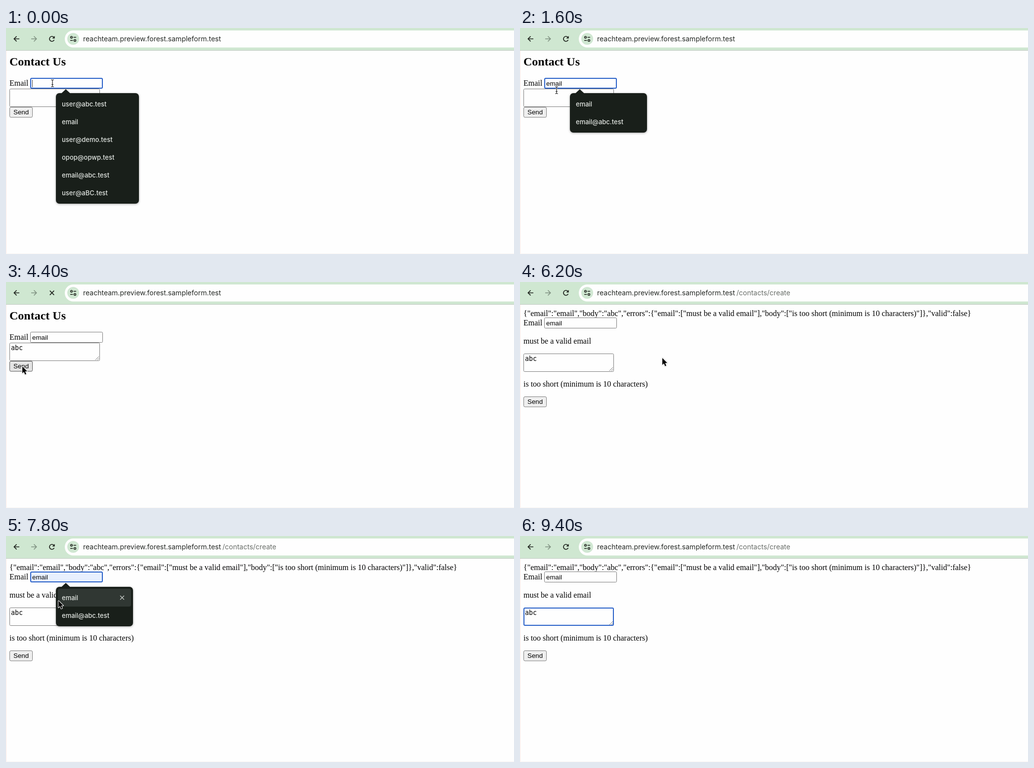
Recreate the animation shown at these times as an HTML page with a canvas. Size 1028 by 458 pixels, loop 9.8 s.

```html
<!DOCTYPE html>
<html lang="en">
<head>
<meta charset="utf-8">
<title>Contact form</title>
<style>
html, body { margin: 0; width: 100%; height: 100%; overflow: hidden; background: #fefefe; }
canvas { display: block; width: 1028px; height: 458px; }
</style>
</head>
<body>
<canvas id="stage"></canvas>
<script>
const W = 1028, H = 458, LOOP = 9800;
const canvas = document.getElementById('stage');
const ctx = canvas.getContext('2d');
const ratio = window.devicePixelRatio || 1;
canvas.width = W * ratio;
canvas.height = H * ratio;

const SERIF = '16px "Liberation Serif", Times, serif';
const HEADING = 'bold 24px "Liberation Serif", Times, serif';
const FIELD = '13.33px "Liberation Sans", Arial, sans-serif';
const MONO = '13.33px "DejaVu Sans Mono", monospace';
const ADDRESS = '14px Inter, sans-serif';
const MENU = '500 13px Inter, sans-serif';

const HOST = 'reachteam.preview.forest.sampleform.test';
const MATCHES = ['email', 'email@abc.test'];
const ENTRIES = ['user@abc.test', 'email', 'user@demo.test',
  'opop@opwp.test', 'email@abc.test', 'user@aBC.test'];

// Each step changes part of the state from its time (ms) on.
const STEPS = [
  [0, { email: '', body: '', focus: 'email', caret: true, menu: ENTRIES,
        hover: false, sent: false, loading: false, pressed: false, mouse: ['beam', 94, 112] }],
  [200, { mouse: null }],
  [400, { email: 'e', menu: MATCHES }],
  [600, { email: 'em' }],
  [800, { email: 'ema' }],
  [1000, { email: 'emai' }],
  [1200, { email: 'email' }],
  [1600, { caret: false, mouse: ['beam', 74, 126] }],
  [1800, { mouse: ['beam', 68, 138] }],
  [2000, { focus: 'body', caret: true, menu: null }],
  [2200, { mouse: ['beam', 66, 140] }],
  [3000, { body: 'abc', mouse: null }],
  [3600, { caret: false, mouse: ['beam', 64, 144] }],
  [3800, { mouse: ['beam', 54, 153] }],
  [4000, { mouse: ['arrow', 42, 165] }],
  [4200, { mouse: ['arrow', 34, 171] }],
  [4400, { focus: '', loading: true, pressed: true, mouse: ['arrow', 33, 171] }],
  [5200, { sent: true, pressed: false }],
  [5400, { loading: false }],
  [6200, { mouse: ['arrow', 288, 154] }],
  [6400, { mouse: ['arrow', 250, 128] }],
  [6600, { mouse: ['arrow', 218, 104] }],
  [7000, { mouse: ['beam', 150, 86] }],
  [7200, { focus: 'email', caret: true, menu: MATCHES, mouse: ['beam', 120, 84] }],
  [7400, { mouse: ['beam', 112, 88] }],
  [7600, { hover: true, mouse: ['arrow', 110, 116] }],
  [7800, { caret: false, mouse: ['arrow', 106, 131] }],
  [8000, { hover: false, mouse: ['beam', 86, 152] }],
  [8200, { focus: 'body', caret: true, menu: null, mouse: ['beam', 78, 160] }],
  [8400, { mouse: ['beam', 76, 162] }],
  [8800, { caret: false, mouse: ['arrow', 120, 215] }],
  [9000, { mouse: ['arrow', 190, 290] }],
  [9200, { mouse: ['arrow', 250, 375] }],
  [9400, { mouse: null }]
];

function stateAt(time) {
  const state = {};
  for (const [start, change] of STEPS) {
    if (start <= time) Object.assign(state, change);
  }
  return state;
}

function text(str, x, y, font, color = '#000') {
  ctx.font = font;
  ctx.fillStyle = color;
  ctx.fillText(str, x, y);
}

function box(x, y, w, h, r, fill, stroke, width = 1) {
  ctx.beginPath();
  ctx.roundRect(x, y, w, h, r);
  if (fill) {
    ctx.fillStyle = fill;
    ctx.fill();
  }
  if (stroke) {
    ctx.strokeStyle = stroke;
    ctx.lineWidth = width;
    ctx.stroke();
  }
}

function rect(x, y, w, h, color) {
  ctx.fillStyle = color;
  ctx.fillRect(x, y, w, h);
}

// Strokes polylines given as flat x, y lists.
function lines(color, width, ...paths) {
  ctx.strokeStyle = color;
  ctx.lineWidth = width;
  ctx.beginPath();
  for (const p of paths) {
    for (let i = 0; i < p.length; i += 2) {
      if (i) ctx.lineTo(p[i], p[i + 1]);
      else ctx.moveTo(p[i], p[i + 1]);
    }
  }
  ctx.stroke();
}

function ring(x, y, r, color, width, from = 0, to = Math.PI * 2) {
  ctx.strokeStyle = color;
  ctx.lineWidth = width;
  ctx.beginPath();
  ctx.arc(x, y, r, from, to);
  ctx.stroke();
}

function polygon(points, fill) {
  ctx.beginPath();
  for (let i = 0; i < points.length; i += 2) ctx.lineTo(points[i], points[i + 1]);
  ctx.closePath();
  ctx.fillStyle = fill;
  ctx.fill();
}

function drawToolbar(s) {
  const ink = '#20251f';
  rect(0, 0, W, 45, '#cfe7d1');
  rect(0, 45, W, 1, '#c3c9c3');
  box(119, 5, W, 34.5, 17.2, '#fefefe');

  lines(ink, 1.7, [27, 22, 16.5, 22], [21.5, 16.8, 16.3, 22, 21.5, 27.2]);
  lines('#7f9181', 1.6, [51, 22, 61.5, 22], [56.5, 16.8, 61.7, 22, 56.5, 27.2]);
  if (s.loading) {
    lines(ink, 1.7, [88.7, 17.7, 97.3, 26.3], [97.3, 17.7, 88.7, 26.3]);
  } else {
    ring(93, 22, 5, ink, 1.7, 0.45, 5.5);
    polygon([98.7, 16, 98.7, 21.2, 93.5, 21.2], ink);
  }

  ctx.beginPath();
  ctx.arc(136, 22, 12, 0, Math.PI * 2);
  ctx.fillStyle = '#d0e7d2';
  ctx.fill();
  ring(132.5, 18.8, 1.9, ink, 1.5);
  ring(139.5, 25.2, 1.9, ink, 1.5);
  lines(ink, 1.5, [136.5, 18.8, 142, 18.8], [130, 25.2, 135.5, 25.2]);

  text(HOST, 156, 27, ADDRESS, '#252925');
  if (s.sent) text('/contacts/create', 438, 27, ADDRESS, '#696e69');
}

function frame(x, y, w, h, focused, fill) {
  if (focused) box(x + 1, y + 1, w - 2, h - 2, 2, fill, '#2860c8', 2);
  else box(x + 0.5, y + 0.5, w - 1, h - 1, 2, fill, '#7d7d7d');
}

function drawForm(s) {
  const emailY = s.sent ? 72 : 101;
  const bodyY = s.sent ? 145 : 123;
  const sendY = s.sent ? 232 : 160;

  if (s.sent) {
    text('{"email":"email","body":"abc","errors":{"email":["must be a valid email"],' +
      '"body":["is too short (minimum is 10 characters)"]},"valid":false}', 7, 69, SERIF);
    text('must be a valid email', 7, 125, SERIF);
    text('is too short (minimum is 10 characters)', 7, 212, SERIF);
  } else {
    text('Contact Us', 7, 76, HEADING);
  }

  text('Email', 7, emailY + 16, SERIF);
  frame(49, emailY, 147, 22, s.focus === 'email', s.hover ? '#e8f0fe' : '#fefefe');
  text(s.email, 53, emailY + 15.5, FIELD);

  frame(7, bodyY, 183, 37, s.focus === 'body', '#fefefe');
  text(s.body, 10, bodyY + 15, MONO);
  lines('#777', 1, [181, bodyY + 35, 188, bodyY + 28], [185, bodyY + 35, 188, bodyY + 32]);

  if (s.caret) {
    ctx.font = FIELD;
    if (s.focus === 'email') {
      rect(53 + ctx.measureText(s.email).width, emailY + 4, 1, 15, '#444');
    } else {
      ctx.font = MONO;
      rect(10 + ctx.measureText(s.body).width, bodyY + 3, 1, 15, '#222');
    }
  }

  box(7.5, sendY + 0.5, 46, 20.5, 2.5,
    s.pressed ? '#e4e4e4' : '#efefef', s.pressed ? '#555' : '#7d7d7d');
  text('Send', 15, sendY + 15, FIELD);
}

function drawMenu(s) {
  const y = s.sent ? 103 : 132;
  const wide = s.menu === ENTRIES ? 168 : 156;
  const dark = '#191f1a';

  ctx.save();
  ctx.shadowColor = 'rgba(0,0,0,.35)';
  ctx.shadowBlur = 4 * ratio;
  ctx.shadowOffsetY = ratio;
  box(101, y, wide, 8 + 36 * s.menu.length, 7, dark);
  ctx.restore();
  polygon([112, y + 0.5, 121, y - 8, 130, y + 0.5], dark);

  if (s.hover) {
    box(105, y + 4, wide - 8, 36, 4, '#303733');
    lines('#c8cdc9', 1.3, [231, y + 18, 239, y + 26], [239, y + 18, 231, y + 26]);
  }
  s.menu.forEach((entry, i) => text(entry, 113, y + 27 + 36 * i, MENU, '#e3e7e3'));
}

function drawMouse([kind, x, y]) {
  ctx.save();
  ctx.translate(x, y);
  if (kind === 'beam') {
    const shape = [[-3, -7, -1, -7, 0, -6, 1, -7, 3, -7], [0, -6, 0, 6],
      [-3, 7, -1, 7, 0, 6, 1, 7, 3, 7], [-2, 2.5, 2, 2.5]];
    lines('rgba(255,255,255,.8)', 2.6, ...shape);
    lines('#222', 1.2, ...shape);
  } else {
    const shape = [0, 0, 0, 14, 3.2, 11, 5.6, 16.4, 8, 15.4, 5.7, 10.2, 10, 10];
    ctx.lineJoin = 'round';
    ctx.shadowColor = 'rgba(0,0,0,.3)';
    ctx.shadowBlur = 2 * ratio;
    lines('#fff', 2, [...shape, 0, 0]);
    ctx.shadowColor = 'transparent';
    polygon(shape, '#000');
  }
  ctx.restore();
}

function draw(now) {
  const s = stateAt(now % LOOP);
  ctx.setTransform(ratio, 0, 0, ratio, 0, 0);
  rect(0, 0, W, H, '#fefefe');
  rect(0, 46, 1, H, '#fbeae6');
  rect(0, H - 1, W, 1, '#f8f4f2');
  drawToolbar(s);
  drawForm(s);
  if (s.menu) drawMenu(s);
  if (s.mouse) drawMouse(s.mouse);
}

const begin = performance.now();
function tick() {
  draw(performance.now() - begin);
  requestAnimationFrame(tick);
}
tick();
</script>
</body>
</html>
```
